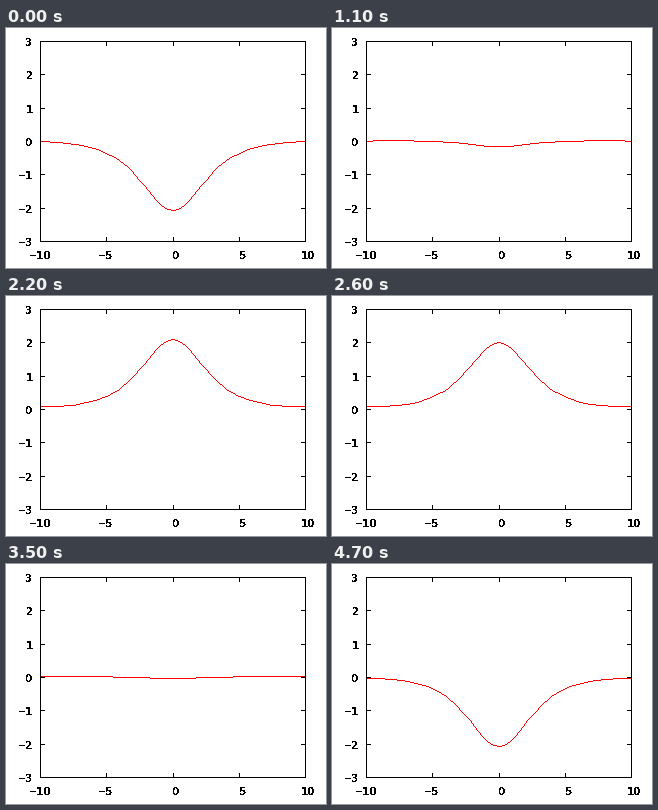
Recreate the animation shown at these times as a matplotlib script. Size 320 by 240 pixels, loop 4800 ms.

```python
import numpy as np
import matplotlib.pyplot as plt
from matplotlib.animation import FuncAnimation

W, H, DPI = 320, 240, 100
FRAMES, INTERVAL = 48, 100
LEFT, RIGHT, TOP, BOTTOM = 34, 299, 13, 213
CELLS, SPAN = 64, 20.0
DX = SPAN / CELLS
DT = DX / 2
TICK = 4

plt.rcParams["font.family"] = "DejaVu Sans"
plt.rcParams["text.antialiased"] = False


def px(x):
    return np.floor(LEFT + (x + 10) * (RIGHT - LEFT) / 20 + 0.5)


def py(y):
    return BOTTOM - np.floor((y + 3) * (BOTTOM - TOP) / 6 + 0.5)


def force(u):
    """Right side of the sine-Gordon equation on a periodic grid."""
    lap = (np.roll(u, 1) - 2 * u + np.roll(u, -1)) / DX**2
    return lap - np.sin(u)


def breather():
    """Leapfrog solution starting from a breather at rest."""
    x = -10 + DX * np.arange(CELLS)
    u = -4 * np.arctan(1 / (np.sqrt(3) * np.cosh(x / 2)))
    states = [u, u + DT**2 / 2 * force(u)]
    while len(states) < FRAMES:
        states.append(2 * states[-1] - states[-2] + DT**2 * force(states[-1]))
    return [np.append(s, s[0]) for s in states]


def raster(xs, ys):
    """Pixels of a one-pixel polyline through whole-number points."""
    cols, rows = [], []
    for x0, y0, x1, y1 in zip(xs[:-1], ys[:-1], xs[1:], ys[1:]):
        n = int(max(abs(x1 - x0), abs(y1 - y0))) + 1
        cols.append(np.floor(np.linspace(x0, x1, n) + 0.5))
        rows.append(np.floor(np.linspace(y0, y1, n) + 0.5))
    return np.concatenate(cols), np.concatenate(rows)


# Whole numbers name pixels: snapping moves lines and markers to their centres.
fig = plt.figure(figsize=(W / DPI, H / DPI), dpi=DPI, facecolor="white")
ax = fig.add_axes([0, 0, 1, 1])
ax.set_xlim(0, W)
ax.set_ylim(H, 0)
ax.axis("off")


def rule(xs, ys, z):
    ax.plot(xs, ys, color="black", lw=72 / DPI, antialiased=False,
            solid_capstyle="projecting", solid_joinstyle="miter", zorder=z)


def label(x, y, value, ha):
    # The figure dash is as wide as a digit.
    ax.text(x, y, str(value).replace("-", "\u2012"), ha=ha, va="baseline",
            fontsize=10.4 * 72 / DPI, weight="bold", color="black")


for v in range(-3, 4):
    y = py(v)
    rule([LEFT, LEFT + TICK], [y, y], 1)
    rule([RIGHT - TICK, RIGHT], [y, y], 1)
    label(27, y + 5, v, "right")

for v in range(-10, 11, 5):
    x = px(v)
    rule([x, x], [TOP, TOP + TICK], 1)
    rule([x, x], [BOTTOM - TICK, BOTTOM], 1)
    label(x + (3.5 if v >= 0 else 0), 231, v, "center")

rule([LEFT, RIGHT, RIGHT, LEFT, LEFT], [TOP, TOP, BOTTOM, BOTTOM, TOP], 3)

curve, = ax.plot([], [], ",", color="red", antialiased=False, zorder=2)
grid = px(np.linspace(-10, 10, CELLS + 1))
waves = breather()


def draw(i):
    curve.set_data(*raster(grid, py(waves[i])))
    return curve,


anim = FuncAnimation(fig, draw, frames=FRAMES, interval=INTERVAL,
                     repeat=True, repeat_delay=0, blit=False)
plt.show()
```
